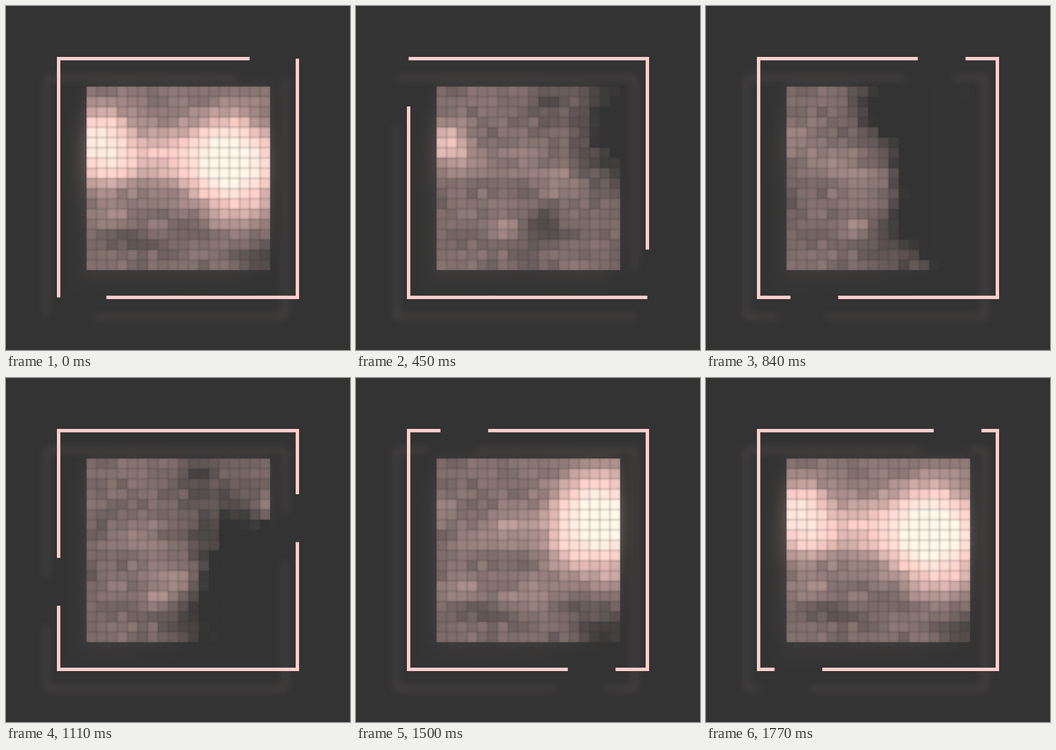
Recreate the animation shown at these times as an HTML page with a canvas. Size 500 px wide and 500 px high, loop 1800 ms.

```html
<!DOCTYPE html>
<html lang="en">
<head>
<meta charset="utf-8">
<title>Glowing grid</title>
<style>
  html, body { margin: 0; width: 100%; height: 100%; overflow: hidden; background: #333; }
  svg, canvas { position: absolute; }
  svg { left: 0; top: 0; filter: drop-shadow(-18px 28px 6px rgba(255, 200, 200, .14)); }
  canvas { left: 116.5px; top: 116.5px; width: 267px; height: 267px; }
  #glow { opacity: .4; filter: blur(11px) drop-shadow(-18px 28px 5px rgba(255, 205, 195, .3)); }
</style>
</head>
<body>
<svg width="500" height="500">
  <path id="frame" fill="none" stroke="#ffcecb" stroke-width="5"/>
</svg>
<canvas id="glow" width="18" height="18"></canvas>
<canvas id="cells" width="534" height="534"></canvas>
<script>
const LOOP = 1800, STEP = 30, N = 18, SIDE = 347, EDGE = 76.5;
const DARK = [51, 51, 51], PINK = [255, 208, 202], CREAM = [255, 247, 234];

// Each spot drifts by (dx, dy) per loop and swells towards its peak time.
const spots = [
  // left light, right light and the bridge between them
  { x: 0.8, y: 5.3, dx: 0, dy: 0, rx: 3.2, ry: 3.6, peak: 130, span: 350, power: 1.3 },
  { x: 14.7, y: 6.2, dx: -10, dy: 7.8, rx: 4.4, ry: 4.3, peak: 1640, span: 420, power: 1.8 },
  { x: 7, y: 6.3, dx: 0, dy: 0, rx: 5, ry: 3, peak: 1760, span: 260, power: 0.45 },
  // dark area falling along the right side, and one at the top
  { x: 16.1, y: 10.5, dx: -5, dy: 30, rx: 6, ry: 9, peak: 930, span: 520, power: -1.1 },
  { x: 10, y: 1, dx: 0, dy: 0, rx: 3.5, ry: 3, peak: 790, span: 330, power: -0.55 },
  // faint light sinking through the middle
  { x: 8.7, y: 10.5, dx: 2, dy: 11, rx: 2.5, ry: 2.5, peak: 1050, span: 600, power: 0.3 }
];

const frame = document.getElementById('frame');
const glow = document.getElementById('glow').getContext('2d');
const cells = document.getElementById('cells').getContext('2d');
const size = 534 / N;

frame.setAttribute('d', `M${EDGE} ${EDGE}h${SIDE}v${SIDE}h${-SIDE}v${-SIDE}h${SIDE}`);
frame.setAttribute('stroke-dasharray', `${SIDE * 1.8} ${SIDE * 0.2}`);

let seed = 7;
function random(min, max) {
  seed = (seed * 16807) % 2147483647;
  return min + (max - min) * seed / 2147483647;
}

// Slow cloudy variation plus a fixed grain per cell
for (let i = 0; i < 36; i++) {
  spots.push({
    x: random(0, N), y: random(0, N), dx: 0, dy: 0,
    rx: random(1.2, 2.6), ry: random(1.2, 2.6),
    peak: random(0, LOOP), span: random(300, 600), power: random(-0.2, 0.2)
  });
}
const grain = Array.from({ length: N * N }, () => random(-0.07, 0.07));

const bell = d => Math.exp(-d * d);
const mix = (a, b, k) => a.map((v, i) => Math.round(v + (b[i] - v) * k));
const shade = v => v < 1 ? mix(DARK, PINK, v) : mix(PINK, CREAM, Math.min(1, (v - 1) / 0.6));

function pose(spot, t) {
  const d = (t - spot.peak + LOOP * 1.5) % LOOP - LOOP / 2;
  const weight = bell(d / spot.span);
  const swell = 0.3 + 0.7 * weight;
  return {
    x: spot.x + spot.dx * d / LOOP,
    y: spot.y + spot.dy * d / LOOP,
    rx: spot.rx * swell,
    ry: spot.ry * swell,
    power: spot.power * weight
  };
}

function brightness(x, y, posed) {
  let v = 0.37 + grain[y * N + x];
  for (const p of posed) v += p.power * bell((x - p.x) / p.rx) * bell((y - p.y) / p.ry);
  return Math.max(0, Math.min(1.7, v));
}

function drawLines(width) {
  for (let i = 0; i <= N; i++) {
    cells.fillRect(i * size - width / 2, 0, width, 534);
    cells.fillRect(0, i * size - width / 2, 534, width);
  }
}

function draw(t) {
  frame.setAttribute('stroke-dashoffset', -SIDE * (1 + 4 * t / LOOP));

  const posed = spots.map(spot => pose(spot, t));
  glow.clearRect(0, 0, N, N);
  for (let y = 0; y < N; y++) {
    for (let x = 0; x < N; x++) {
      const v = brightness(x, y, posed);
      glow.fillStyle = `rgba(255, 215, 195, ${v * 0.5})`;
      glow.fillRect(x, y, 1, 1);
      cells.fillStyle = `rgb(${shade(v)})`;
      cells.fillRect(x * size, y * size, size + 1, size + 1);
    }
  }

  cells.fillStyle = 'rgba(51, 51, 51, .06)';
  [2, 5, 10].forEach(drawLines);
}

const start = performance.now();
function tick() {
  const t = (performance.now() - start) % LOOP;
  draw(Math.floor(t / STEP) * STEP);
  requestAnimationFrame(tick);
}
tick();
</script>
</body>
</html>
```
